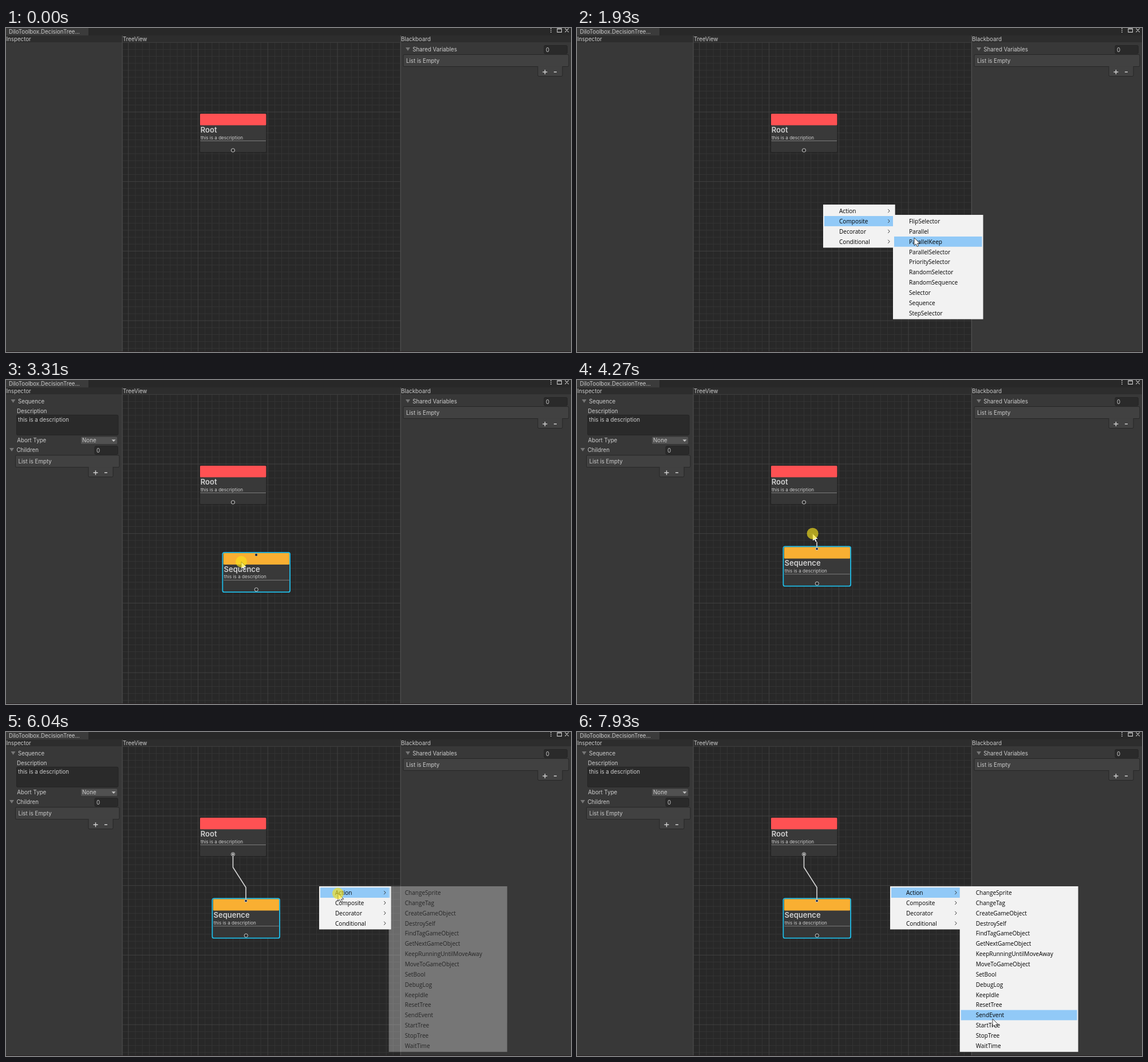
Write an HTML page that moves like this. It is 987x567 px and loops after 8 s.

```html
<!DOCTYPE html>
<html lang="en">
<head>
<meta charset="utf-8">
<title>Tree editor</title>
<style>
  html, body { margin: 0; width: 100%; height: 100%; overflow: hidden; background: #383838; }
  svg { display: block; width: 100%; height: 100%; }
  text { font: 9.73px Inter, sans-serif; fill: #cdcdcd; white-space: pre; }
  .title { font-size: 12.98px; font-weight: 600; fill: #d2d2d2; }
  .desc { font-size: 8.11px; }
  .menu text { font: 10.05px "Open Sans", "Noto Sans", sans-serif; fill: #000; }
  .field { fill: #2a2a2a; stroke: #212121; stroke-width: .8; }
  .list { fill: #414141; stroke: #242424; stroke-width: .9; }
  .tri { fill: #767676; }
  .sign { stroke: #d0d0d0; stroke-width: 1.4; fill: none; }
  .port { fill: #2b2b2b; stroke: #cfcfcf; stroke-width: 1; }
</style>
</head>
<body>
<svg id="stage" viewBox="0 0 987 567" preserveAspectRatio="none"></svg>
<script>
const LOOP = 8000, ROW = 17.86, PAD = 2.2, MENU_W = 125.7;
const stage = document.getElementById('stage');

const text = (x, y, s, cls = '') => `<text x="${x}" y="${y}" class="${cls}">${s}</text>`;
const rect = (x, y, w, h, attr = '') => `<rect x="${x}" y="${y}" width="${w}" height="${h}" ${attr}/>`;
const fill = c => `fill="${c}"`;
const foldout = (x, y) => `<path class="tri" d="M${x - 4} ${y - 3}h8l-4 6z"/>`;

// Square grid with every tenth line brighter
function grid() {
  const step = 12.17, lines = ['', ''];
  for (let i = -11; i < 36; i++) {
    const x = 335.6 + i * step, y = 147 + i * step, major = +(i % 10 === 0);
    if (x > 204 && x < 689) lines[major] += `M${x} 25V567`;
    if (y > 25 && y < 566) lines[major] += `M204 ${y}H689`;
  }
  return lines.map((d, i) => `<path d="${d}" stroke="${i ? '#444' : '#363636'}" stroke-width=".9"/>`).join('');
}

// Empty list with its size field and add / remove buttons
function emptyList(x, y, right) {
  const foot = right - 54, mid = y + 30.5;
  return rect(right - 43, y - 16, 40.5, 14.5, 'class="field" rx="2"') +
    text(right - 40, y - 5, '0') +
    rect(foot, y + 19, 43, 19, 'class="list" rx="2"') +
    rect(x, y, right - x, 21, 'class="list" rx="2"') +
    rect(foot + .5, y + 20, 42, 2, fill('#414141')) +
    text(x + 5, y + 14.2, 'List is Empty') +
    `<path class="sign" d="M${foot + 8.5} ${mid}h8m-4 -4v8M${foot + 28} ${mid}h5"/>`;
}

function chrome() {
  const heads = [[.5, 'Inspector'], [204, 'TreeView'], [690, 'Blackboard']];
  return rect(0, 0, 987, 567, fill('#383838')) +
    rect(0, 0, 987, 13, fill('#282828')) +
    rect(0, 0, 144, 13, fill('#3b3b3b')) +
    text(5, 10, 'DiloToolbox.DecisionTree...') +
    [1, 4.1, 7.2].map(y => `<circle cx="952" cy="${y}" r=".9" fill="#c8c8c8"/>`).join('') +
    '<path d="M963 1h7.5v6.4h-7.5zM963 1.7h7.5M976.5 .7l6.4 6.6m0 -6.6l-6.4 6.6" fill="none" stroke="#c8c8c8" stroke-width="1.1"/>' +
    rect(0, 13, 987, 12, fill('#2d2d2d')) +
    rect(203, 25, 486, 542, fill('#282828')) + grid() +
    [202.7, 689].map(x => rect(x, 13, 1, 554, fill('#505050'))).join('') +
    rect(0, 566, 987, 1, fill('#2a2224')) +
    heads.map(([x, s]) => text(x, 22.5, s)).join('') +
    foldout(702, 37) + text(710.3, 40.5, 'Shared Variables') +
    emptyList(694, 46.5, 983);
}

function inspector() {
  return foldout(12.5, 37) + text(21, 40.5, 'Sequence') +
    text(19, 57.6, 'Description') +
    rect(18.5, 61.3, 177.5, 35, 'class="field" rx="2"') + text(21, 72.5, 'this is a description') +
    text(19.3, 109.2, 'Abort Type') +
    rect(130.3, 99, 64.5, 13.6, 'fill="#515151" stroke="#303030" stroke-width=".8" rx="2"') +
    text(133, 109.2, 'None') +
    '<path d="M184.5 104.3h7l-3.5 3.6z" fill="#c4c4c4"/>' +
    foldout(10, 122) + text(18.5, 125.6, 'Children') +
    emptyList(16.5, 131.7, 198);
}

function node(id, name, color, hasInput) {
  return `<g id="${id}">` +
    rect(-.4, -.4, 116.2, 68, 'fill="#363636" stroke="#222" stroke-width=".8" rx="2"') +
    rect(0, 20, 115.4, 27, fill('#393939')) +
    rect(0, 0, 115.4, 20.28, `fill="${color}" rx="1.5"`) +
    rect(.5, 47.1, 114.5, .9, fill('#858585')) +
    text(.8, 33.2, name, 'title') + text(.9, 44.6, 'this is a description', 'desc') +
    '<circle class="port" cx="57.5" cy="64" r="3.1"/>' +
    (hasInput ? '<circle class="in" cx="57.3" cy="3.3" r="2.3" fill="#16223a" stroke="#d8d8d8"/>'
              : '<circle class="dot" cx="57.5" cy="64" r="1.7" fill="#cfcfcf"/>') +
    '<rect class="ring" x="-1.4" y="-.9" width="117.7" height="69.4" rx="3" fill="none" stroke="#22bfea" stroke-width="1.8"/></g>';
}

function menu(id, x, y, w, items, arrows) {
  const chevron = cy => `<path d="M${x + 113.3} ${cy - 3}l2.8 3l-2.8 3" fill="none" stroke="#333"/>`;
  return `<g id="${id}" class="menu">` +
    rect(x, y, w, items.length * ROW + 2 * PAD - .4, fill('#f2f2f2')) +
    rect(x + 2, 0, w - 4, ROW, 'class="hot" fill="#91c9f7"') +
    items.map((s, i) => {
      const cy = y + PAD + ROW * (i + .5);
      return text(x + 28, cy + 3.9, s) + (arrows ? chevron(cy) : '');
    }).join('') + '</g>';
}

const kinds = ['Action', 'Composite', 'Decorator', 'Conditional'];
const composites = ['FlipSelector', 'Parallel', 'ParallelKeep', 'ParallelSelector', 'PrioritySelector',
  'RandomSelector', 'RandomSequence', 'Selector', 'Sequence', 'StepSelector'];
const actions = ['ChangeSprite', 'ChangeTag', 'CreateGameObject', 'DestroySelf', 'FindTagGameObject',
  'GetNextGameObject', 'KeepRunningUntilMoveAway', 'MoveToGameObject', 'SetBool', 'DebugLog', 'KeepIdle',
  'ResetTree', 'SendEvent', 'StartTree', 'StopTree', 'WaitTime'];

const CREATE = 2690, GRAB = 3030, DROP = 3475, PULL = 3910, LINK = 4930;

// Each pop-up: place, opening times, closing time, and the kind that opens its submenu
const popups = [
  { id: 'm1', x: 430, y: 309, sx: 552, sy: 327, sw: 157.5, subs: composites, open: 900, sub: 1450, close: CREATE, kind: 1 },
  { id: 'm2', x: 547, y: 270, sx: 668.7, sy: 270, sw: 206.8, subs: actions, open: 5440, sub: 5974, close: LOOP, kind: 0 }
];

stage.innerHTML = chrome() +
  `<g id="inspector">${inspector()}</g>` +
  node('root', 'Root', '#ff5153', false) +
  node('seq', 'Sequence', '#f9af32', true) +
  '<path id="edge" fill="none" stroke="#d6d6d6" stroke-width="1.6" stroke-linejoin="round"/>' +
  popups.map(p => menu(p.id, p.x, p.y, MENU_W, kinds, true) +
    menu(p.id + 's', p.sx, p.sy, p.sw, p.subs, false)).join('') +
  '<path id="cursor" d="M0 0V13.6L3.1 10.8L5.2 15.4L7.6 14.3L5.6 9.9H9.9Z" fill="#fff" stroke="#111" stroke-width=".8"/>' +
  '<circle id="press" r="10" fill="#f7e21c" opacity=".65"/>';

const $ = q => stage.querySelector(q);
const show = (el, on) => el.setAttribute('visibility', on ? 'visible' : 'hidden');
const move = (el, x, y) => el.setAttribute('transform', `translate(${x} ${y})`);
const clamp = v => Math.max(0, Math.min(1, v));
const ease = k => k * k * (3 - 2 * k);

// Places where the pointer rests: arrival, departure, x, y
const grip = [463.5, 326], rest = [393, 307.5];
const stops = [
  [0, 60, 945, 560],
  [700, 1000, 430, 309],
  [1350, 1400, 500, 338],
  [1930, 2000, 589, 367],
  [2540, CREATE, 602, 482],
  [GRAB, 3090, ...grip],
  [3310, 3370, 411, 318],
  [3440, 3510, ...rest],
  [3650, PULL, 419, 295.5],
  [4850, 4950, 396.5, 214],
  [5280, 5350, 516, 267.5],
  [5420, 5500, 547, 270],
  [5900, 6110, 580, 282.5],
  [6460, 6460, 675, 290],
  [7090, 7160, 713, 429],
  [7540, 7580, 709, 388],
  [7930, LOOP, 726, 502]
];
const clicks = [700, 2550, 5420, 5980], CLICK = 125;

function pointer(t) {
  const i = stops.findIndex(s => t <= s[1]);
  const [arrive, , x, y] = stops[i];
  if (t >= arrive) return [x, y];
  const [, leave, x0, y0] = stops[i - 1];
  const k = ease((t - leave) / (arrive - leave));
  return [x0 + (x - x0) * k, y0 + (y - y0) * k];
}

const pressed = t => clicks.some(c => t >= c && t < c + CLICK) ||
  (t >= GRAB && t < DROP) || (t >= PULL && t < LINK);

function setRow(el, top, row, count) {
  const hot = el.querySelector('.hot');
  const on = row >= 0 && row < count;
  hot.setAttribute('opacity', +on);
  if (on) hot.setAttribute('y', top + PAD + row * ROW);
}

function drawPopup(p, t, x, y) {
  const fade = (start, len) => t < p.close ? clamp((t - start) / len) : 0;
  const rowAt = top => Math.floor((y - top - PAD) / ROW);
  const main = $('#' + p.id), sub = $('#' + p.id + 's');
  main.setAttribute('opacity', fade(p.open, 130));
  sub.setAttribute('opacity', fade(p.sub, 200));
  setRow(main, p.y, t >= p.sub ? p.kind : x > p.x + 2 ? rowAt(p.y) : -1, kinds.length);
  setRow(sub, p.sy, x >= p.sx ? rowAt(p.sy) : -1, p.subs.length);
}

function drawEdge(t, x, y) {
  const edge = $('#edge'), linked = t >= LINK;
  const ax = linked ? 396.5 : x, ay = linked ? 217.3 : Math.min(y, 291);
  const stub = Math.min(19.5, (291.5 - ay) / 3);
  show(edge, t >= PULL);
  edge.setAttribute('d', `M${ax} ${ay}v${stub}L419 ${291.5 - stub}V292`);
}

function draw(t) {
  const [x, y] = pointer(t);
  move($('#cursor'), x, y);
  move($('#press'), x, y);
  show($('#cursor'), t > 60);
  show($('#press'), pressed(t));

  move($('#root'), 339, 150);
  show($('#root .dot'), t >= LINK);
  show($('#root .ring'), t > LINK - 200 && t < LINK + 120);
  $('#root .ring').setAttribute('opacity', .5);

  const [hx, hy] = t < GRAB ? grip : t < DROP ? [x, y] : rest;
  move($('#seq'), hx - 31.2, hy - 15.3);
  show($('#seq'), t >= CREATE);
  show($('#seq .ring'), t >= GRAB);
  $('#seq .in').setAttribute('stroke-width', t >= PULL ? 1 : .4);
  show($('#inspector'), t >= GRAB);

  drawEdge(t, x, y);
  popups.forEach(p => drawPopup(p, t, x, y));
}

const start = performance.now();
function tick() {
  draw((performance.now() - start) % LOOP);
  requestAnimationFrame(tick);
}
tick();
</script>
</body>
</html>
```
